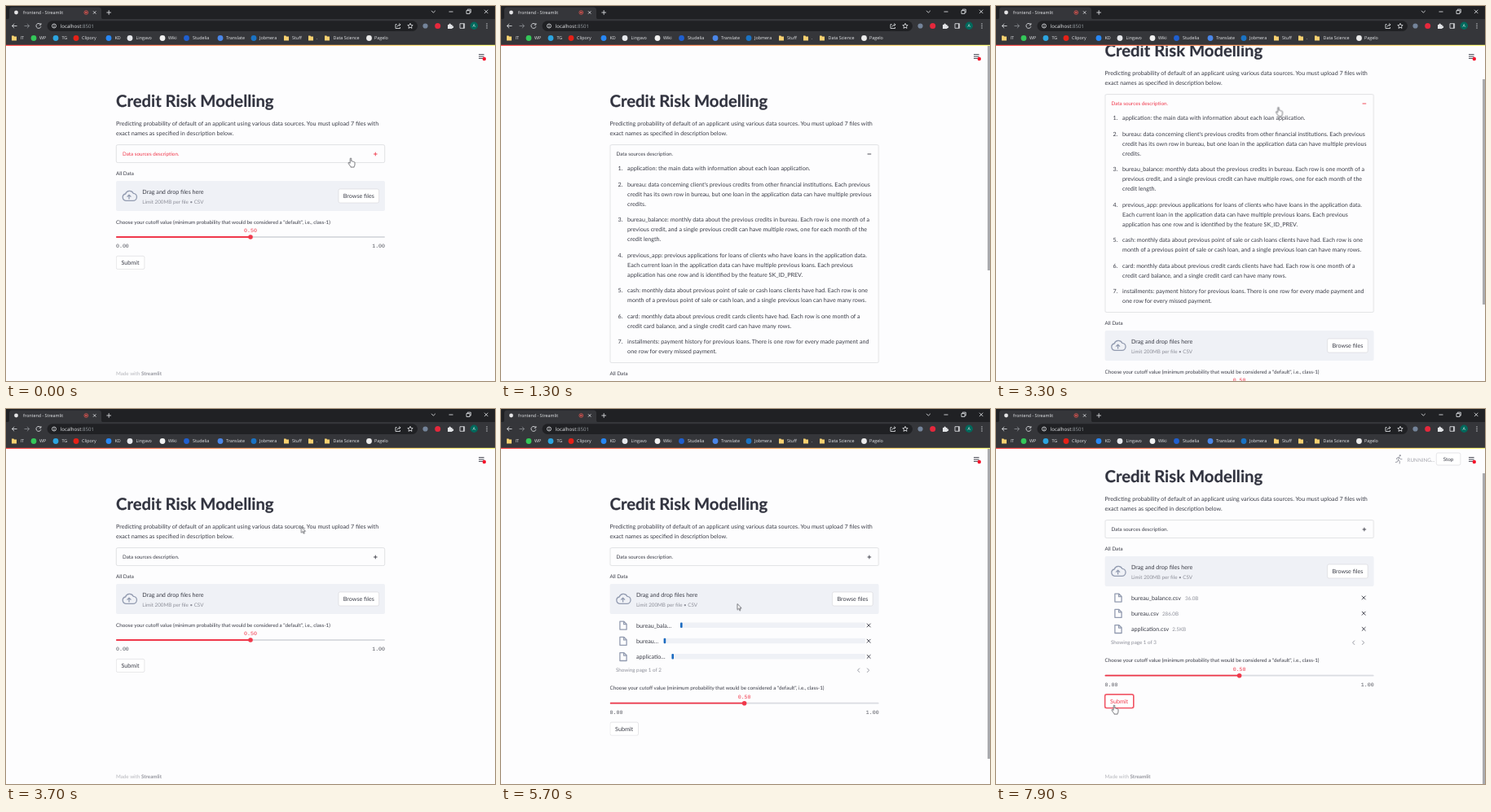
These frames come from a looping animation (600 px wide and 461 px high, 8000 ms). An HTML page:

```html
<!DOCTYPE html>
<html lang="en">
<head>
<meta charset="utf-8">
<title>Credit Risk Modelling</title>
<style>
html, body { margin: 0; width: 100%; height: 100%; overflow: hidden; background: #fff; }
svg { display: block; width: 100%; height: 100%; }
text { white-space: pre; text-rendering: geometricPrecision; font-variant-ligatures: none; }

.page text { font: 7.16px Lato, "Open Sans", sans-serif; fill: #3a3c47; }
.page .h1 { font-size: 20.3px; font-weight: 700; fill: #31333f; stroke: #31333f; stroke-width: .2; }
.page .sm { font-size: 6.27px; }
.page .dim { fill: #8d8f99; }
.page .mono { font: 6.6px "Liberation Mono", monospace; fill: #55575f; }
.page .red { fill: #f0384b; }
.mid { text-anchor: middle; }
.end { text-anchor: end; }
.btn { fill: #fff; stroke: #d5d6d9; stroke-width: .6; }
.ink { fill: none; stroke: #31333f; stroke-width: .9; }
.slate { fill: none; stroke: #929bb0; stroke-width: 1.3; stroke-linejoin: round; }

.chrome text { font: 5.4px "Open Sans", "Noto Sans", sans-serif; fill: #e8eaed; }
.chrome .url { font-size: 6.1px; }
.chrome .off { fill: #9aa0a6; }
.line { fill: none; stroke: #d6d8dc; stroke-width: .9; }

/* motion: one 8 s loop, 1 % = 80 ms */
.scroll, .shift, .below, .tail, .foot, .frame, .thumb, .cursor { animation: 8s infinite both; }
.scroll { animation-name: scroll; }
.shift { animation-name: shift; animation-timing-function: step-end; }
.below { animation-name: below; }
.tail { animation-name: tail; animation-timing-function: step-end; }
.foot { animation-name: foot; }
.frame { animation-name: frame; }
.thumb { animation-name: thumb; }
.cursor { animation-name: move; animation-timing-function: ease-in-out; }

@keyframes scroll {
  0%, 17.5% { transform: none; }
  22.5%, 42% { transform: translateY(-62px); }
  45%, 81.25% { transform: none; }
  86.25%, 100% { transform: translateY(-34px); }
}
@keyframes shift {
  0%, 45% { transform: none; }
  6.25%, 69.3% { transform: translateX(-1.4px); }
}
@keyframes below {
  0%, 5.5% { transform: none; }
  10%, 42% { transform: translateY(246px); }
  45%, 100% { transform: none; }
}
@keyframes tail {
  0% { transform: none; }
  69.3%, 100% { transform: translateY(77.7px); }
}
@keyframes foot {
  0%, 5.5% { transform: none; }
  10%, 42% { transform: translateY(203px); }
  45%, 69.3% { transform: none; }
  69.31%, 100% { transform: translateY(34px); }
}
@keyframes frame {
  0%, 5.5% { height: 22px; }
  10%, 42% { height: 268px; }
  45%, 100% { height: 22px; }
}
@keyframes thumb {
  0%, 6.2% { opacity: 0; height: 277px; transform: none; }
  6.25%, 17.5% { opacity: 1; height: 277px; transform: none; }
  22.5%, 42% { opacity: 1; height: 277px; transform: translateY(42px); }
  44.9% { opacity: 1; height: 405px; transform: none; }
  45%, 69.2% { opacity: 0; height: 382px; transform: none; }
  69.3%, 81.25% { opacity: 1; height: 382px; transform: none; }
  86.25%, 100% { opacity: 1; height: 382px; transform: translateY(31px); }
}
@keyframes move {
  0%, 5% { transform: translate(423px, 187px); }
  12.5%, 17.5% { transform: translate(393px, 202.5px); }
  35% { transform: translate(340px, 215px); }
  40%, 44% { transform: translate(346.5px, 124.5px); }
  51.5%, 53% { transform: translate(430px, 232px); }
  70%, 80% { transform: translate(290px, 239.5px); }
  92% { transform: translate(145px, 367px); }
  95%, 100% { transform: translate(145px, 364px); }
}

/* hard switches */
.sw { animation: 8s step-end infinite both; }
.closed { animation-name: closed; }
.open { animation-name: open; }
.hover { animation-name: hover; }
.closed.hover { animation-name: closed, hover; }
.open.hover { animation-name: open, hover; }
.files { animation-name: files; }
.busy { animation-name: busy; }
.done { animation-name: done; }
.hot { animation-name: hot; }
.run { animation-name: run; }
.seen { animation-name: seen; }
.hand { animation-name: hand; }
.arrow { animation-name: arrow; }
@keyframes closed { 0%, 42% { visibility: visible; } 5.5% { visibility: hidden; } }
@keyframes open { 0%, 45% { visibility: hidden; } 5.5% { visibility: visible; } }
@keyframes hover { 0%, 38.75% { fill: #f0384b; stroke: #f0384b; } 11%, 46% { fill: #3a3c47; stroke: #3a3c47; } }
@keyframes files { 0% { visibility: hidden; } 69.3% { visibility: visible; } }
@keyframes busy { 0%, 74.5% { visibility: hidden; } 69.3% { visibility: visible; } }
@keyframes done { 0% { visibility: hidden; } 74.5% { visibility: visible; } }
@keyframes hot { 0% { visibility: hidden; } 92.5% { visibility: visible; } }
@keyframes run { 0% { visibility: hidden; } 95% { visibility: visible; } }
@keyframes seen { 0%, 35%, 70% { opacity: 1; } 16.25%, 53% { opacity: 0; } }
@keyframes hand { 0%, 38.75%, 50%, 92% { visibility: visible; } 8.75%, 46%, 70% { visibility: hidden; } }
@keyframes arrow { 0%, 38.75%, 50%, 92% { visibility: hidden; } 8.75%, 46%, 70% { visibility: visible; } }

.page text.hover { stroke-width: 0; }
.glow { animation: glow 2s ease-out infinite both; }
@keyframes glow {
  0%, 10% { r: 2.2px; opacity: 0; }
  25% { r: 3.6px; opacity: .45; }
  55% { r: 4px; opacity: .35; }
  65%, 100% { r: 4.2px; opacity: 0; }
}
</style>
</head>
<body>
<svg viewBox="0 0 600 461">
  <defs>
    <linearGradient id="deco"><stop stop-color="#ff4b4b"/><stop offset="1" stop-color="#fffd80"/></linearGradient>
  </defs>
  <rect width="600" height="461" fill="#fdfdfe"/>

  <g class="page">
    <g class="scroll"><g class="shift">
      <text class="h1" x="135" y="124.4">Credit Risk Modelling</text>
      <text x="135" y="147.2">Predicting probability of default of an applicant using various data sources. You must upload 7 files with</text>
      <text x="135" y="159.2">exact names as specified in description below.</text>
      <text class="sm sw hover" x="143" y="184">Data sources description.</text>
      <path class="ink sw closed hover" d="M451 182h4.6M453.3 179.7v4.6"/>
      <path class="ink sw open hover" d="M451 182h4.6"/>
      <g id="list" class="sw open"></g>

      <g class="below">
        <rect x="130" y="192.8" width="340" height="400" fill="#fdfdfe"/>
        <text class="sm" x="135" y="208.4">All Data</text>
        <rect x="135" y="215" width="330" height="37" rx="2" fill="#eff1f6"/>
        <path class="slate" d="M147 239.3a4.2 4.2 0 0 1-.4-8.3a5.2 5.2 0 0 1 9.6-.7a4.4 4.4 0 0 1-.5 9zM151 237.5v-5M148.6 234.6l2.4-2.5l2.4 2.5"/>
        <text x="167.3" y="231.1">Drag and drop files here</text>
        <text class="sm dim" x="167.3" y="242.5">Limit 200MB per file • CSV</text>
        <rect class="btn" x="408" y="225" width="49.6" height="17" rx="1.9"/>
        <text class="mid" x="432.8" y="236.1">Browse files</text>

        <g id="files" class="sw files">
          <text class="sm dim sw busy" x="142.4" y="323.4">Showing page 1 of 2</text>
          <text class="sm dim sw done" x="142.4" y="323.4">Showing page 1 of 3</text>
          <path class="ink" style="stroke:#8d8f99" d="M441.4 318.6l-2.4 2.6l2.4 2.6M450.6 318.6l2.4 2.6l-2.4 2.6"/>
        </g>

        <g class="tail">
          <text class="sm" x="135" y="267.7">Choose your cutoff value (minimum probability that would be considered a "default", i.e., class-1)</text>
          <text class="mono red mid" x="300" y="278.3">0.50</text>
          <rect x="135" y="283" width="330" height="1.9" rx=".9" fill="#dadce1"/>
          <rect x="135" y="283" width="165" height="1.9" rx=".9" fill="#f0384b"/>
          <circle cx="300" cy="284" r="2.8" fill="#f0384b"/>
          <text class="mono" x="135" y="297.2">0.00</text>
          <text class="mono end" x="465" y="297.2">1.00</text>
          <rect class="btn" x="135.3" y="307.4" width="34.6" height="16.2" rx="1.9"/>
          <text class="mid" x="152.5" y="318.1">Submit</text>
          <g class="sw hot">
            <rect class="btn" style="stroke:#f0384b" x="135.3" y="307.4" width="34.6" height="16.2" rx="1.9"/>
            <text class="mid red" x="152.5" y="318.1">Submit</text>
          </g>
          <rect class="sw run" x="134.9" y="307" width="35.4" height="17" rx="2.2" fill="none" stroke="#f0384b" stroke-opacity=".75" stroke-width="1.6"/>
        </g>
      </g>

      <rect class="frame" x="135.3" y="170.6" width="329.4" height="22" rx="1.9" fill="none" stroke="#d5d6d9" stroke-width=".7"/>
      <g class="foot">
        <text class="sm" x="135" y="454.4" style="fill:#b4b5ba">Made with <tspan fill="#96979f" font-weight="700">Streamlit</tspan></text>
      </g>
    </g></g>

    <rect class="thumb" x="597" y="48" width="3" height="277" fill="#aaabaf"/>
    <g class="sw run">
      <g fill="none" stroke="#9b9da6" stroke-width="1" stroke-linecap="round">
        <path d="M494.8 59.2l-1.4 3.4l2 1.6l-.2 2.8M493.5 62.7l-.9 2.3l-2.2.4M494.6 59.2l-2.5.8l-.6 1.7M494.9 60l1.3 1.6l1.8.1"/>
        <circle cx="495.7" cy="57.2" r=".7" fill="#9b9da6"/>
      </g>
      <text class="sm" x="504.6" y="64.9" style="fill:#a5a6ad">RUNNING...</text>
      <rect class="btn" x="540.3" y="54" width="29.6" height="15" rx="1.9"/>
      <text class="mid sm" x="555" y="63.8">Stop</text>
    </g>
    <path class="ink" d="M580 59.6h6.6M580 62h6.6M580 64.4h6.6"/>
    <circle class="glow" cx="586.8" cy="65" r="2.2" fill="#ff1a2e"/>
    <circle cx="586.8" cy="65" r="2.2" fill="#f5142c"/>
  </g>

  <g class="chrome">
    <rect width="600" height="16.5" fill="#202124"/>
    <rect y="16" width="600" height="32" fill="#35363a"/>
    <path d="M1 16.5q3 0 3-3V5q0-3.5 3.5-3.5h106q3.5 0 3.5 3.5v8.5q0 3 3 3z" fill="#35363a"/>
    <circle cx="12.5" cy="8" r="2.4" fill="#e4e4e6"/>
    <text x="21" y="10">frontend - Streamlit</text>
    <circle cx="98.3" cy="8" r="2.4" fill="none" stroke="#d9534f" stroke-width=".8"/>
    <circle cx="98.3" cy="8" r="1.2" fill="#d9534f"/>
    <path class="line" d="M107 6.3l3.4 3.4m0-3.4l-3.4 3.4M123.4 8h5.6m-2.8-2.8v5.6M522 5.8l2.4 2.4l2.4-2.4M543.5 7h5M587 4.7l4.4 4.4m0-4.4l-4.4 4.4M565 5.5h4v4h-4zM566.3 5.3v-1.2h4v4h-1.2"/>
    <path class="line" d="M13.5 24.5h-6m2.6-2.7l-2.7 2.7l2.7 2.7M42.4 22.6a3 3 0 1 0 .5 2.6M42.9 21v2.2h-2.2"/>
    <path class="line" style="stroke:#85888d" d="M22.5 24.5h6m-2.6-2.7l2.7 2.7l-2.7 2.7"/>
    <rect x="50.5" y="18.3" width="454.5" height="12.6" rx="6.3" fill="#202124"/>
    <circle class="line" cx="59" cy="24.5" r="2.5"/>
    <path class="line" d="M59 24.2v1.6M59 22.8v.7"/>
    <text class="url" x="66.8" y="26.7">localhost<tspan class="off">:8501</tspan></text>
    <path class="line" d="M479.5 22.5h-1.5v5h5.5v-1.5M480 25.5q.5-2.5 3.7-2.5m-1.3-1.7l1.7 1.7l-1.7 1.7"/>
    <path class="line" d="M496 21.3l.9 2.1l2.3.2l-1.7 1.5l.5 2.3l-2-1.2l-2 1.2l.5-2.3l-1.7-1.5l2.3-.2z"/>
    <circle cx="514.5" cy="24.5" r="3.1" fill="#74849a"/>
    <circle cx="529.7" cy="24.5" r="3.5" fill="#e5283c"/>
    <path d="M542 23h1.5a1.2 1.2 0 1 1 2.3 0h1.7v1.7a1.2 1.2 0 1 1 0 2.2v1.2h-5.5z" fill="#e1e3e6"/>
    <path class="line" d="M557 21.7h5.6v5.6h-5.6zM561.5 21.7v5.6"/>
    <circle cx="574.3" cy="24.3" r="4.7" fill="#00695c"/>
    <text class="mid" x="574.3" y="26.2">A</text>
    <g fill="#d6d8dc"><circle cx="590" cy="22" r=".7"/><circle cx="590" cy="24.5" r=".7"/><circle cx="590" cy="27" r=".7"/></g>
    <g id="marks"></g>
    <rect y="47.8" width="600" height="1.2" fill="url(#deco)"/>
  </g>

  <g class="sw seen"><g class="cursor" stroke="#44464c" stroke-width=".7" stroke-linejoin="round" fill="#fff">
    <path class="sw arrow" d="M0 0v7.3l1.7-1.5l1.2 2.5l1.1-.5l-1.2-2.5h2.3z"/>
    <path class="sw hand" d="M-.8 6.3v-5.5q0-.8.8-.8t.8.8v3q1.2-.4 1.5.4q1.2-.3 1.5.5q1.2-.1 1.2.9v2.3q0 1.3-.8 2.4v.8h-4.3v-.8q-1.3-1.2-2.8-4q-.3-1 .7-.9z"/>
  </g></g>
</svg>
<script>
const add = (parent, tag, attrs, text = '') => {
  const el = document.createElementNS('http://www.w3.org/2000/svg', tag);
  for (const k in attrs) el.setAttribute(k, attrs[k]);
  el.textContent = text;
  return parent.appendChild(el);
};
const byId = id => document.getElementById(id);

// Numbered descriptions inside the expander
const items = [
  ['application: the main data with information about each loan application.'],
  ["bureau: data concerning client's previous credits from other financial institutions. Each previous",
   'credit has its own row in bureau, but one loan in the application data can have multiple previous',
   'credits.'],
  ['bureau_balance: monthly data about the previous credits in bureau. Each row is one month of a',
   'previous credit, and a single previous credit can have multiple rows, one for each month of the',
   'credit length.'],
  ['previous_app: previous applications for loans of clients who have loans in the application data.',
   'Each current loan in the application data can have multiple previous loans. Each previous',
   'application has one row and is identified by the feature SK_ID_PREV.'],
  ['cash: monthly data about previous point of sale or cash loans clients have had. Each row is one',
   'month of a previous point of sale or cash loan, and a single previous loan can have many rows.'],
  ['card: monthly data about previous credit cards clients have had. Each row is one month of a',
   'credit card balance, and a single credit card can have many rows.'],
  ['installments: payment history for previous loans. There is one row for every made payment and',
   'one row for every missed payment.']
];
let y = 202.1;
items.forEach((lines, i) => {
  add(byId('list'), 'text', { x: 150.8, y, class: 'end' }, i + 1 + '.');
  for (const line of lines) {
    add(byId('list'), 'text', { x: 156.5, y }, line);
    y += 12;
  }
  y += 7.5;
});

// Uploaded files: short name, bar start, full name, size, size position
[['bureau_bala…', 221.4, 'bureau_balance.csv', '36.0B', 233.4],
 ['bureau…', 201, 'bureau.csv', '286.0B', 205.4],
 ['applicatio…', 210.8, 'application.csv', '2.5KB', 217.6]
].forEach(([short, bar, name, size, sizeX], i) => {
  const row = add(byId('files'), 'g', { transform: `translate(0 ${266 + i * 19.2})` });
  add(row, 'path', { class: 'slate', d: 'M147.3-4.8h5l3.2 3.2v6.7h-8.2zM152-4.8v3.5h3.5' });
  add(row, 'path', { class: 'ink', d: 'M450.3-2.3l4.6 4.6m0-4.6l-4.6 4.6' });
  const busy = add(row, 'g', { class: 'sw busy' });
  add(busy, 'text', { x: 167.4, y: 2.6 }, short);
  add(busy, 'rect', { x: bar, y: -3.4, width: 448.4 - bar, height: 6.4, rx: 1, fill: '#eff1f6' });
  add(busy, 'rect', { x: bar, y: -3.4, width: 2.6, height: 6.4, rx: 1, fill: '#1c6bc0' });
  const done = add(row, 'g', { class: 'sw done' });
  add(done, 'text', { x: 167.4, y: 2.6 }, name);
  add(done, 'text', { x: sizeX, y: 2.6, class: 'sm dim' }, size);
});

// Bookmarks: label, icon centre, label start, dot colour (none = folder)
[['IT', 10, 17.5], ['WP', 34, 41, '#34c759'], ['TG', 61, 68.5, '#2ca5e0'],
 ['Clipory', 86, 93, '#e62117'], ['KD', 126, 133.5, '#2787f5'],
 ['Lingavo', 152, 159.5, '#e6e8ec'], ['Wiki', 192, 199, '#f1f1f1'],
 ['Studelia', 221.5, 229, '#1f5fd0'], ['Translate', 263, 270, '#4a86e8'],
 ['Jobmera', 304, 311, '#1a73c4'], ['Stuff', 344, 351], ['.', 374, 381],
 ['Data Science', 394, 401.5], ['Pagelo', 445.5, 452, '#ececec']
].forEach(([label, cx, x, color]) => {
  const marks = byId('marks');
  if (color) add(marks, 'circle', { cx, cy: 39.5, r: 3.4, fill: color });
  else add(marks, 'path', { d: `M${cx - 3} 36.6h2.4l.8.9h2.8v5h-6z`, fill: '#f7d070' });
  add(marks, 'text', { x, y: 41.4 }, label);
});
</script>
</body>
</html>
```
